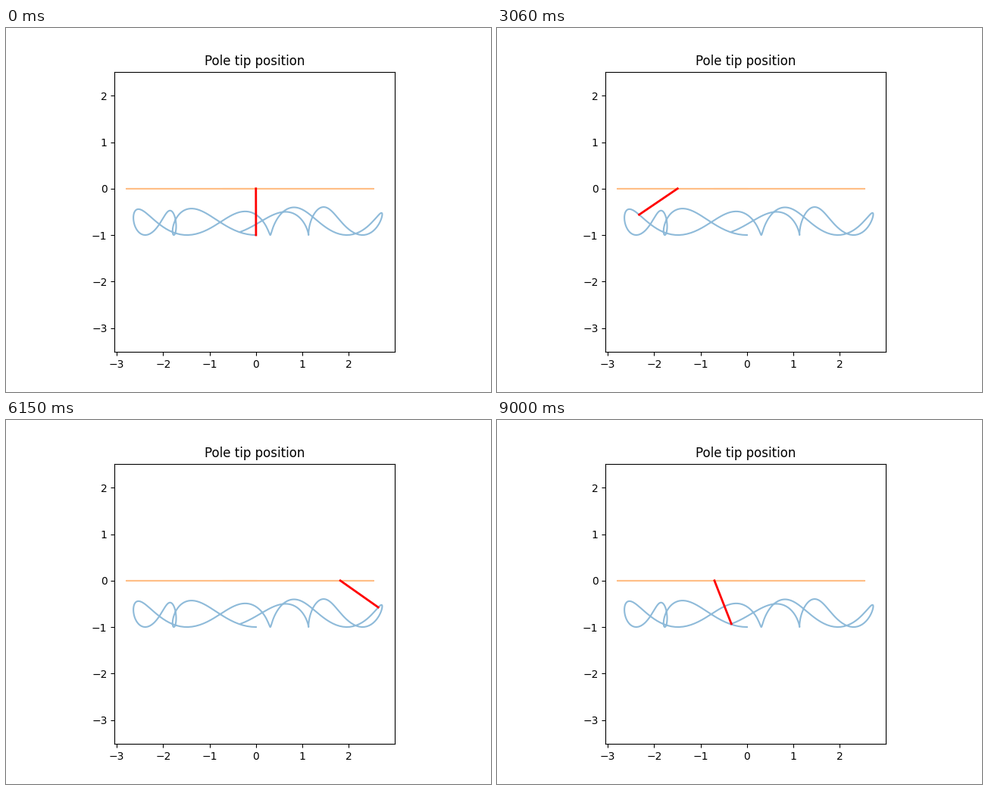
A matplotlib script for the animation above (9.03 s loop, 640 by 480 pixels).

```python
import numpy as np
import matplotlib.pyplot as plt
from matplotlib.animation import FuncAnimation

FRAMES, STEP_MS = 301, 30
SWAY = 0.722    # slow cart sway, rad/s
SWING = 2.7566  # pole swing, rad/s


def pole_angle(t):
    p = SWING * t - 0.04
    return (-0.0445 - 1.0945 * np.sin(p) - 0.018 * (np.sin(p) + np.sin(3 * p))
            + 0.03 * np.sin(SWAY * t))


def cart_position(t):
    center = -2.37 * np.sin(SWAY * t) - 0.022 * (1 - np.cos(SWAY * t))
    return center - 0.535 * np.sin(pole_angle(t))


t = np.arange(FRAMES) * STEP_MS / 1000
theta = pole_angle(t)
cart = cart_position(t)
cart -= cart[0]
tip_x, tip_y = cart + np.sin(theta), -np.cos(theta)

fig, ax = plt.subplots(figsize=(6.4, 4.8), dpi=100)
ax.set_aspect("equal")
ax.set_xlim(-3.046, 2.988)
ax.set_ylim(-3.517, 2.517)
ax.set_xticks(range(-3, 3))
ax.set_yticks(range(-3, 3))
ax.set_title("Pole tip position")

ax.plot(tip_x, tip_y, color="C0", alpha=0.5)
ax.plot(cart, np.zeros(FRAMES), color="C1", alpha=0.5)
pole, = ax.plot([], [], color="red", lw=2)


def update(i):
    pole.set_data([cart[i], tip_x[i]], [0, tip_y[i]])
    return pole,


anim = FuncAnimation(fig, update, frames=FRAMES, interval=STEP_MS,
                     repeat=True, repeat_delay=0, blit=True)
plt.show()
```
